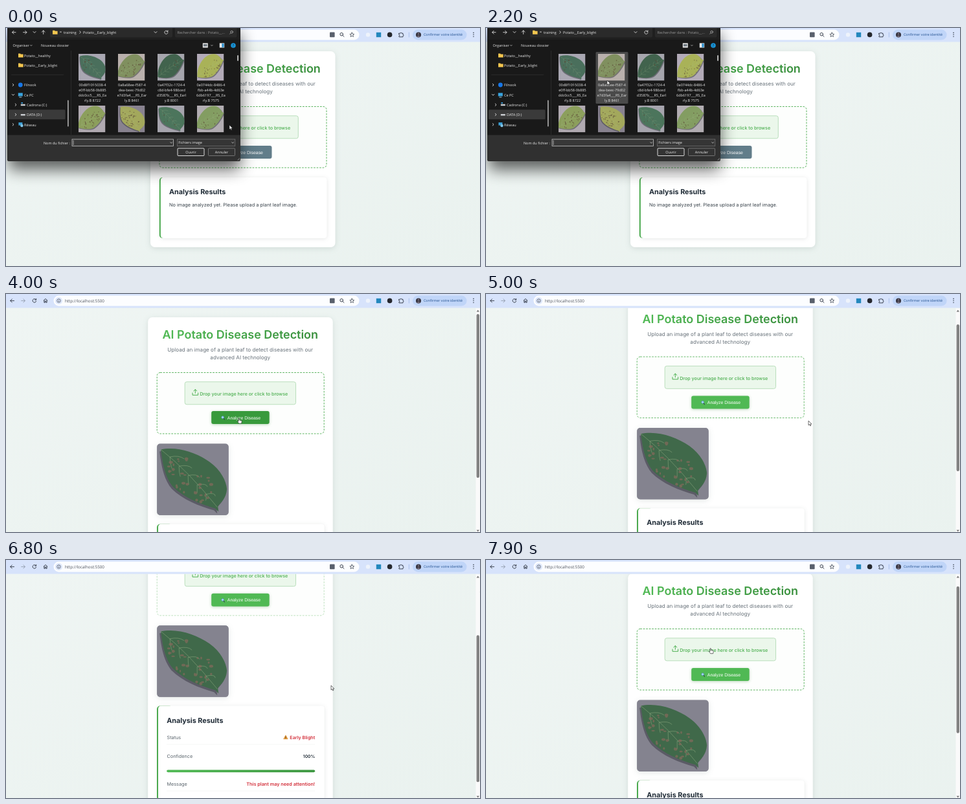
An HTML page that plays this animation: 732 px wide and 368 px high, repeating every 8 s.

```html
<!DOCTYPE html>
<html lang="fr">
<head>
<meta charset="utf-8">
<title>Leaf check</title>
<style>
html, body { margin: 0; width: 100%; height: 100%; overflow: hidden; background: #ecf3f1; }
svg { display: block; width: 732px; height: 368px; text-rendering: geometricPrecision; }
.ui { font-family: "Open Sans", "Noto Sans", sans-serif; font-size: 5.5px; }
.page { font-family: Inter, "Open Sans", sans-serif; font-size: 7.25px; }
.mid { text-anchor: middle; }
.end { text-anchor: end; }
.semi { font-weight: 600; }
.line { fill: none; stroke-linecap: round; stroke-linejoin: round; }
.card { filter: drop-shadow(0 2px 4px rgba(40, 70, 60, .13)); }
.soft { filter: drop-shadow(0 1px 3px rgba(40, 60, 50, .12)); }
.btn { filter: drop-shadow(0 1.5px 2px rgba(60, 140, 60, .35)); }
</style>
</head>
<body>
<svg viewBox="0 0 732 368" width="732" height="368">
  <defs>
    <linearGradient id="titleInk" gradientUnits="userSpaceOnUse" x1="246" x2="485" y1="0" y2="0">
      <stop stop-color="#4fb953"/><stop offset="1" stop-color="#398f3d"/>
    </linearGradient>
    <linearGradient id="barInk"><stop stop-color="#4fb953"/><stop offset="1" stop-color="#3b963f"/></linearGradient>
    <linearGradient id="back" x2="1" y2="1"><stop stop-color="#eff5f3"/><stop offset="1" stop-color="#eaf2ef"/></linearGradient>
    <clipPath id="view"><rect y="21.5" width="732" height="347"/></clipPath>
    <clipPath id="photoClip"><rect width="110.5" height="110.5" rx="5"/></clipPath>
    <clipPath id="files"><rect x="101" y="35" width="255" height="126.5"/></clipPath>
    <clipPath id="dialogClip"><path d="M2 0H362V203Q362 206 359 206H5Q2 206 2 203Z"/></clipPath>
  </defs>

  <rect width="732" height="368" fill="url(#back)"/>

  <g clip-path="url(#view)">
    <g id="doc" class="page">
      <rect id="sheet" class="card" x="223" y="36" width="285.5" height="303" rx="7" fill="#fff"/>
      <text class="mid semi" x="365.6" y="69" font-size="17.95" fill="url(#titleInk)">AI Potato Disease Detection</text>
      <g class="mid" font-size="8.1" fill="#69737b">
        <text x="365.5" y="89">Upload an image of a plant leaf to detect diseases with our</text>
        <text x="365.5" y="101">advanced AI technology</text>
      </g>

      <rect id="glow" x="237" y="121.5" width="258" height="94.5" rx="5" fill="none" stroke="#6cc970" stroke-width="4" opacity="0" style="filter:blur(1.5px)"/>
      <rect id="zone" x="237" y="121.5" width="258" height="94.5" rx="5" fill="#fdfefd" stroke="#5ab35e" stroke-width="1" stroke-dasharray="2.7 1.8"/>

      <rect x="280" y="135.8" width="171.3" height="35" rx="3" fill="#ebf7eb" stroke="#b4dcb6" stroke-width=".9"/>
      <path class="line" stroke="#4caf50" stroke-width="1" d="M291.8 153V156.3H300.4V153M296.1 153.3V147.8M293.6 150L296.1 147.6L298.6 150"/>
      <text x="303" y="157" font-size="7.15" font-weight="500" fill="#4caf50">Drop your image here or click to browse</text>

      <g id="button">
        <rect id="face" x="321" y="182" width="89.5" height="20" rx="3"/>
        <path class="line" stroke="#37474f" stroke-width="1.2" d="M339.6 193.2L341.3 195"/>
        <circle cx="338.4" cy="191.7" r="1.9" fill="#a8dcf7" stroke="#4d86b8" stroke-width=".7"/>
        <text x="345.6" y="194.6" fill="#fff" style="font:6.9px 'Liberation Sans', Arial, sans-serif">Analyze Disease</text>
      </g>

      <g id="photo" transform="translate(237 231.5)"></g>

      <g id="results">
        <rect id="panelEdge" x="236.8" y="231" width="24" height="94" rx="5" fill="#4caf50"/>
        <path id="panel" class="soft" fill="#fff"/>
        <text x="252" y="257" font-size="10.8" font-weight="700" fill="#1f2b36">Analysis Results</text>
        <text id="empty" x="252" y="276" font-size="7.35" fill="#38424a">No image analyzed yet. Please upload a plant leaf image.</text>
        <g id="report">
          <path d="M252 290.5H481M252 362.5H481" stroke="#f1f4f3" stroke-width=".7"/>
          <g fill="#59636b">
            <text x="252.3" y="282.3">Status</text>
            <text x="252.3" y="311.3">Confidence</text>
            <text x="252.3" y="354.6">Message</text>
          </g>
          <g class="end semi" fill="#d32f3a">
            <text x="481" y="282.3" font-size="7.1">Early Blight</text>
            <text x="481" y="354.6">This plant may need attention!</text>
            <text x="481" y="311.1" font-size="6.7" fill="#26313b">100%</text>
          </g>
          <path d="M435.7 276.4L438.9 282.2H432.5Z" fill="#f2a033" stroke="#d98a2a" stroke-width=".7" stroke-linejoin="round"/>
          <path d="M435.7 278.2V281.6" stroke="#333" stroke-width=".8"/>
          <rect x="252" y="330" width="229" height="3.6" rx="1.8" fill="url(#barInk)"/>
        </g>
      </g>
    </g>

    <g id="scrollbar">
      <rect x="725.5" y="22" width="7" height="346" fill="#fafafa"/>
      <path d="M726.6 27.5L728.8 24.5L731 27.5ZM726.6 364.8L728.8 367.6L731 364.8Z" fill="#777"/>
      <rect id="thumb" x="726.6" y="31" width="4.4" rx="2.2" fill="#818181"/>
    </g>
  </g>

  <g class="ui">
    <rect width="732" height="21.5" fill="#d7e3fb"/>
    <rect x="73.5" y="2.6" width="472" height="15.8" rx="7.9" fill="#fcfdff"/>
    <g class="line" stroke="#3c4350" stroke-width="1">
      <path d="M12.5 10.4H6.8M9.3 7.8L6.7 10.4L9.3 13"/>
      <path d="M23.7 10.4H29.4M26.9 7.8L29.5 10.4L26.9 13" stroke="#98a3b5"/>
      <path d="M46 8.4A2.8 2.8 0 1 0 46.6 11.2M46.6 7.3V9.2H44.7"/>
      <path d="M58.2 10L61 7.4L63.8 10M58.9 9.6V13.2H60.2V11H61.8V13.2H63.1V9.6"/>
      <circle cx="518.2" cy="9.7" r="2.3"/><path d="M520 11.5L522 13.4"/>
      <path d="M534.3 7L535.3 9.3L537.7 9.5L535.9 11.1L536.4 13.5L534.3 12.2L532.2 13.5L532.7 11.1L530.9 9.5L533.3 9.3Z" stroke-width=".8"/>
      <path d="M607 8.2H609A1 1 0 0 1 611 8.2H613V10.2A1 1 0 0 1 613 12.2V13.8H607V12A1 1 0 0 0 607 10Z"/>
      <path d="M622.4 7V14" stroke="#9fb7e6" stroke-width=".8"/>
    </g>
    <circle cx="81.5" cy="10.4" r="5.6" fill="#dfe8fb"/>
    <circle cx="81.5" cy="10.4" r="2.7" fill="none" stroke="#3c4350" stroke-width=".7"/>
    <path d="M81.5 9.9V12M81.5 8.6V9.1" stroke="#3c4350" stroke-width=".7"/>
    <text x="91" y="12.6" font-size="6.3" fill="#4b5058">http://localhost:5500</text>
    <rect x="500" y="6.6" width="7.6" height="7.6" rx="1" fill="#59606c"/>
    <circle cx="559" cy="10.4" r="3.2" fill="#eef3fb"/>
    <rect x="571.8" y="6.8" width="7.4" height="7.4" fill="#2387bd"/>
    <circle cx="592.6" cy="10.4" r="3.8" fill="#26282e"/>
    <rect x="628" y="2.6" width="83.5" height="15.8" rx="7.9" fill="#c0d5f8"/>
    <circle cx="637" cy="10.4" r="4" fill="#34313c"/>
    <path d="M634.3 13.2Q637 9.3 639.7 13.2Q637 15.4 634.3 13.2Z" fill="#6d6674"/><circle cx="637" cy="9" r="1.5" fill="#6d6674"/>
    <text x="645" y="12.4" font-size="5.35" fill="#20508f">Confirmer votre identité</text>
    <g fill="#3c4350"><circle cx="722" cy="7.4" r=".8"/><circle cx="722" cy="10.3" r=".8"/><circle cx="722" cy="13.2" r=".8"/></g>
  </g>

  <g id="dialog" class="ui" fill="#e9e9e9">
    <rect x="4" y="8" width="358" height="211" rx="6" fill="#000" opacity=".62" style="filter:blur(12px)"/>
    <g clip-path="url(#dialogClip)">
      <rect width="364" height="207" fill="#191919"/>
      <rect y="0" width="364" height="18" fill="#1f1f1f"/>
      <rect x="68" y="-4" width="189" height="18.5" rx="2" fill="#2a2a2a"/>
      <rect x="261" y="-4" width="95.5" height="18.5" rx="2" fill="#2a2a2a"/>
      <rect y="165.5" width="364" height="41" fill="#303030"/>
      <path d="M100.5 35V165M8 72.3H89" stroke="#333" stroke-width=".7"/>
      <rect x="4" y="126.3" width="87.5" height="15" rx="1.5" fill="#3a3a3a"/>
      <rect x="95" y="111.5" width="1.8" height="41" rx=".9" fill="#a0a0a0"/>
      <rect x="357.2" y="42" width="1.8" height="9" rx=".9" fill="#c4c4c4"/>
      <g class="line" stroke="#dedede" stroke-width=".9">
        <path d="M15 6.7H9.6M12 4.3L9.6 6.7L12 9.1"/>
        <path d="M26.6 6.7H32M29.6 4.3L32 6.7L29.6 9.1"/>
        <path d="M42 5.5L44 7.5L46 5.5"/>
        <path d="M57.7 9.4V4M55.3 6.3L57.7 3.9L60.1 6.3"/>
        <path d="M229 5.6L231 7.6L233 5.6M249.4 5A2.6 2.6 0 1 0 250 7.2M250 3.9V5.6H248.2"/>
        <path d="M83.4 6.1H85.4M113.8 4.7L115.4 6.5L113.8 8.3"/>
        <circle cx="348.6" cy="6.2" r="1.8" stroke="#aaa"/><path d="M347.2 7.6L345.6 9.2" stroke="#aaa"/>
        <path d="M10.2 86.3L12 88L10.2 89.7M9.2 102.4L11 104.2L12.8 102.4M14.2 117L16 118.7L14.2 120.4M14.2 132.2L16 133.9L14.2 135.6M10.2 147.6L12 149.3L10.2 151"/>
        <path d="M37.7 26.4L38.9 27.6L40.1 26.4M316.7 26.4L317.9 27.6L319.1 26.4" stroke-width=".7"/>
      </g>
      <g id="folders"></g>
      <text x="89" y="8.7">training</text><text x="119" y="8.7">Potato__Early_blight</text>
      <text x="264.5" y="8.7" fill="#9a9a9a">Rechercher dans : Potato__...</text>
      <text x="10.5" y="29">Organiser</text><text x="54" y="29">Nouveau dossier</text>
      <rect x="303.8" y="23.4" width="8" height="7" fill="#e6e6e6"/><rect x="305" y="25" width="5.6" height="3.4" fill="#6d7780"/>
      <rect x="329.8" y="23.4" width="7.4" height="7" fill="#eee"/><rect x="333.4" y="24" width="3.2" height="5.8" fill="#2a8fd0"/>
      <circle cx="351" cy="27" r="3.8" fill="#1992d4"/><text class="mid" x="351" y="29" fill="#123">?</text>

      <text x="28" y="44.5">Potato__healthy</text><text x="28" y="59.5">Potato__Early_blight</text>
      <circle cx="22.3" cy="88" r="3.4" fill="#1777e8"/><text x="28" y="90">Filnook</text>
      <rect x="18.8" y="100.4" width="7" height="5" fill="#39a5e0"/><path d="M20.3 107H24.3" stroke="#9ccbe6"/><text x="28" y="105.8">Ce PC</text>
      <path d="M22.8 119H29.8M22.8 134.2H29.8" stroke="#c9ccd0" stroke-width="2.6"/><path d="M23.4 115.8H26" stroke="#36a0e0" stroke-width="1.8"/>
      <text x="32" y="120.8">Cadrona (C:)</text><text x="32" y="136">DATA (D:)</text>
      <rect x="19.4" y="146" width="6" height="4.6" fill="#3c9fd6"/><circle cx="24.4" cy="151" r="2.2" fill="#7fc3e6"/><text x="28" y="151.6">Réseau</text>

      <g clip-path="url(#files)"><rect id="hover" width="50" height="80" rx="1.5" fill="#4a4a4a"/><g id="grid"></g></g>

      <text class="end" x="99" y="179.5">Nom du fichier :</text>
      <rect x="102" y="172" width="156.5" height="10.5" fill="#383838" stroke="#c2c2c2" stroke-width=".8"/>
      <path d="M104 173.6V181" stroke="#eee" stroke-width=".6"/>
      <rect x="264.3" y="172" width="89.5" height="10.5" fill="#353535" stroke="#777" stroke-width=".7"/>
      <path class="line" stroke="#dedede" stroke-width=".7" d="M253.7 176.6L255.2 178L256.7 176.6M348.7 176.6L350.2 178L351.7 176.6"/>
      <text x="266.3" y="179.4">Fichiers image</text>
      <rect x="265" y="186" width="41" height="11.5" rx="1" fill="#333" stroke="#ececec" stroke-width=".9"/>
      <rect x="312.5" y="186" width="41" height="11.5" rx="1" fill="#333" stroke="#858585" stroke-width=".8"/>
      <g class="mid"><text x="285.5" y="193.8">Ouvrir</text><text x="333" y="193.8">Annuler</text></g>
      <path d="M357.5 204.5L360.8 201.2M359.5 204.5L360.8 203.2" stroke="#aaa" stroke-width=".7"/>
    </g>
  </g>

  <g id="pointer" stroke="#222" stroke-width=".65" fill="#fff" stroke-linejoin="round">
    <path id="arrow" d="M0 0V6.9L1.6 5.5L2.7 8L3.8 7.5L2.8 5.1H4.9Z"/>
    <path id="hand" d="M-.5 .4Q.2 -.5 .9 .4V3L4 3.7Q4.8 4 4.7 5L4.2 8.2H.2L-2 5.2Q-1.8 4.2 -.5 5Z"/>
  </g>
</svg>
<script>
const $ = id => document.getElementById(id);
const LOOP = 8000, CLOSE = 2250, LOADED = 2800, DONE = 4400;

function seeded(seed) {
  return () => (seed = (seed * 16807) % 2147483647) / 2147483647;
}

// One leaf photo in a 110.5 unit square; wide stretches the leaf across its midrib.
function leaf({ seed, back, color, spot, count, angle = 0, wide = 1 }) {
  const rnd = seeded(seed);
  let spots = '';
  for (let i = 0; i < count; i++) {
    const u = .2 + rnd() * .65, v = (rnd() - .5) * 50 * Math.sin(Math.PI * u);
    spots += `<ellipse cx="${6 + 88 * u + v * .7}" cy="${9 + 88 * u - v * .7}" rx="${1 + rnd() * 2.2}" ry="${1 + rnd() * 1.5}"/>`;
  }
  let veins = 'M6 9Q48 42 93 98';
  for (let i = 1; i < 6; i++) {
    const x = 6 + 14 * i, y = 6 + 14.4 * i;
    veins += `M${x} ${y}q14 -3 ${24 - i * 2} 3M${x} ${y}q0 10 ${4 - i} ${20 - i * 2}`;
  }
  const body = 'M6 9C30 4 60 13 81 28C99 41 107 58 108 70C107 85 98 91 94 97L95 105L90 100C68 94 41 83 25 67C11 51 8 25 6 9Z';
  return `<rect width="110.5" height="110.5" fill="${back}"/>
    <g transform="rotate(${angle} 55 55) translate(55 55) rotate(45) scale(1 ${wide}) rotate(-45) translate(-55 -55)">
      <path d="${body}" fill="#34343f" opacity=".5" transform="translate(-2 3)"/>
      <path d="${body}" fill="${color}"/>
      <path d="${veins}" fill="none" stroke="#a9bf92" stroke-width="1" opacity=".4"/>
      <g fill="${spot}" opacity=".7">${spots}</g>
    </g>`;
}

const photo = leaf({ seed: 41, back: '#84838f', color: '#40694a', spot: '#866a5c', count: 36 });
$('photo').innerHTML = `<rect class="card" width="110.5" height="110.5" rx="5" fill="#84838f"/>
  <g clip-path="url(#photoClip)">${photo}</g>`;

const names = [
  ['00d8f10f-5038-4', 'e0ff-bb58-0b885', 'ddc0cc5___RS_Ea', 'rly.B 8722'],
  ['0a8a68ee-f587-4', 'dea-beec-79d02', 'e7d3fa4___RS_Ear', 'ly.B 8461'],
  ['0a47f32c-1724-4', 'c8d-bfe4-986ced', 'd3587b___RS_Earl', 'y.B 8001'],
  ['0a0744dc-8486-4', 'fbb-a44b-4d63e', '6db6197___RS_Ea', 'rly.B 7575']
];
const tints = [
  ['#4a6f5c', '#a9a7b2', 10, 0], ['#80905f', '#b9b0ac', 30, -75], ['#41634d', '#a5a5ac', 8, -80], ['#a9b258', '#b3abb8', 24, -80],
  ['#8c9f5c', '#b0a9b0', 30, -75], ['#a3a85c', '#88828f', 34, 5], ['#4c755c', '#a6a4ad', 10, 0], ['#839d62', '#b2adb2', 14, -75]
];
$('grid').innerHTML = tints.map(([color, back, count, angle], i) => {
  const x = 112 + 61 * (i % 4), y = i < 4 ? 40 : 120;
  const label = i < 4 ? names[i].map((s, k) => `<text class="mid" x="${x + 21.5}" y="${90.4 + 7.7 * k}">${s}</text>`).join('') : '';
  const art = leaf({ seed: i + 5, back, color, spot: '#5e4c38', count, angle, wide: 1.2 });
  return `<svg x="${x}" y="${y}" width="41.5" height="41.5" viewBox="0 0 110.5 110.5">${art}</svg>${label}`;
}).join('');
$('folders').innerHTML = [[72, 3.8], [19, 39.5], [19, 54.6]].map(([x, y]) =>
  `<path d="M${x} ${y}h3l1 1h3.6v5h-7.6z" fill="#f4c64f"/>`).join('');

// Tracks: [time, ...values], eased between entries.
const pointerTrack = [
  [0, 345, 150], [200, 345, 150], [1050, 187, 81], [2200, 187, 81], [2480, 247, 137], [2700, 247, 137],
  [3400, 359.5, 192], [4250, 359.5, 192], [4850, 498, 196], [5700, 498, 196], [5800, 500.5, 195],
  [6000, 500.5, 195], [6200, 502, 194], [7200, 502, 194], [7480, 484, 178], [7880, 346.5, 136.5]
];
const scrollTrack = [[4900, 0], [5300, 153.7], [6725, 153.7], [6875, 107.5], [7075, 61.2], [7250, 15]];
const glowTrack = [[2250, 0], [2450, .45], [2700, .45], [2850, 0]];
const dashTrack = [[4900, 1], [5300, .4], [6900, .4], [7300, 1]];

function at(track, t) {
  const i = track.findIndex(k => k[0] > t);
  if (i < 1) return (i ? track[track.length - 1] : track[0]).slice(1);
  const a = track[i - 1], b = track[i], u = (t - a[0]) / (b[0] - a[0]);
  const e = u * u * (3 - 2 * u);
  return a.slice(1).map((v, k) => v + (b[k + 1] - v) * e);
}

const show = (id, on) => $(id).setAttribute('display', on ? 'inline' : 'none');
const set = (id, attrs) => { for (const k in attrs) $(id).setAttribute(k, attrs[k]); };
const inside = (x, y, l, t, r, b) => x >= l && x <= r && y >= t && y <= b;

function draw(t) {
  const open = t < CLOSE, loaded = t >= LOADED, done = t >= DONE;
  const [x, y] = at(pointerTrack, t), [scroll] = at(scrollTrack, t);
  const dx = loaded ? -3.8 : 0, px = x - dx, py = y + scroll;
  const onButton = !open && loaded && inside(px, py, 321, 182, 410.5, 202);
  const onLabel = !open && inside(px, py, 280, 136, 451, 171);

  set('doc', { transform: `translate(${dx} ${-scroll})` });
  set('sheet', { height: done ? 479 : loaded ? 427 : 303 });
  set('glow', { opacity: at(glowTrack, t)[0] });
  set('zone', { 'stroke-opacity': at(dashTrack, t)[0] });
  set('button', { transform: `translate(0 ${onButton ? -1 : 0})` });
  set('face', { fill: !loaded ? '#627d8a' : onButton ? '#389a3c' : '#50b954', class: loaded ? 'btn' : '' });
  show('photo', loaded);

  const h = done ? 146 : 94;
  set('results', { transform: `translate(0 ${loaded ? 124.7 : 0})` });
  set('panelEdge', { height: h });
  set('panel', { d: `M242 231H491Q495.5 231 495.5 236V${226 + h}Q495.5 ${231 + h} 491 ${231 + h}H242Q238.8 ${230 + h} 238.8 ${226 + h}V236Q238.8 232 242 231Z` });
  show('empty', !done);
  show('report', done);

  const size = done ? 500 : 448;
  show('scrollbar', loaded);
  set('thumb', { y: 31 + scroll * 328 / size, height: 346 * 328 / size });

  show('dialog', open);
  const col = Math.floor((x - 108.5) / 61), row = y < 117 ? 0 : 1;
  const cell = 108.5 + 61 * col;
  show('hover', col >= 0 && col < 4 && x < cell + 50 && y > 37 && y < 162);
  set('hover', { x: cell, y: 37 + 80 * row });

  set('pointer', { transform: `translate(${x} ${y})` });
  show('hand', onButton || onLabel);
  show('arrow', !(onButton || onLabel));
}

const start = performance.now();
function tick() {
  draw((performance.now() - start) % LOOP);
  requestAnimationFrame(tick);
}
tick();
</script>
</body>
</html>
```
